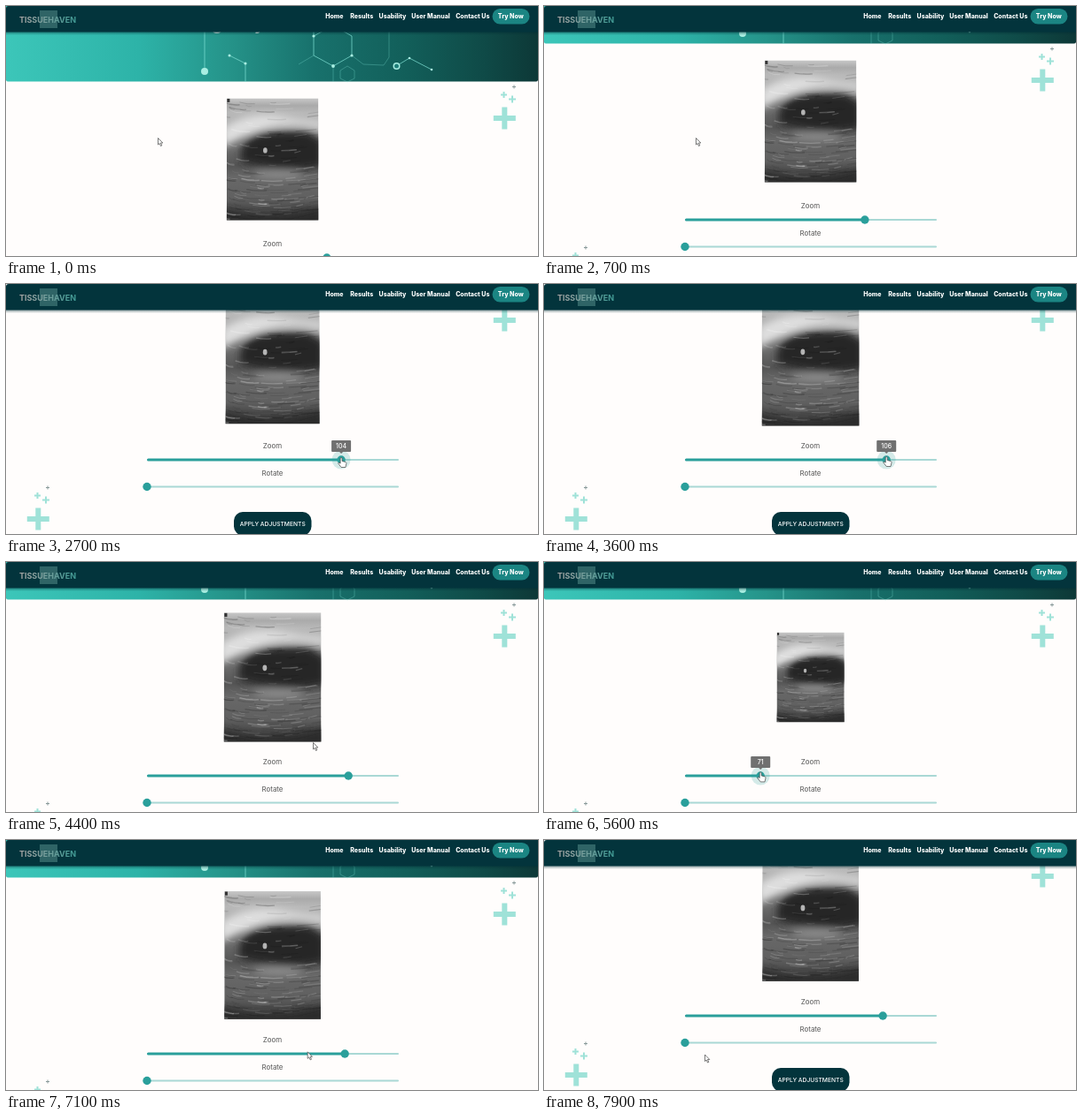
These frames come from a looping animation (600 px wide and 283 px high, 8000 ms). An HTML page:

```html
<!DOCTYPE html>
<html lang="en">
<head>
<meta charset="utf-8">
<title>Image adjustments</title>
<style>
html, body { margin: 0; width: 100%; height: 100%; overflow: hidden; background: #fffdfc; }
svg { display: block; width: 600px; height: 283px; }
text { font-family: Inter, "Open Sans", sans-serif; text-anchor: middle; }
.nav { font-size: 7px; font-weight: 800; fill: #fff; }
.label { font-size: 7.9px; fill: #555; }
.rail { fill: #a9d8d5; }
.accent { fill: #2a9f9b; }
.lines { fill: none; stroke: #7fe0d4; stroke-width: .9; }
.cursor path { fill: #fff; stroke: #444; stroke-width: .7; stroke-linejoin: round; }
</style>
</head>
<body>
<svg viewBox="0 0 600 283">
  <defs>
    <linearGradient id="banner">
      <stop offset="0" stop-color="#3cc6b9"/><stop offset=".25" stop-color="#2db3a8"/>
      <stop offset=".42" stop-color="#259389"/><stop offset=".58" stop-color="#18716c"/>
      <stop offset=".75" stop-color="#125f5a"/><stop offset=".9" stop-color="#0f4a47"/>
      <stop offset="1" stop-color="#0d3837"/>
    </linearGradient>
    <linearGradient id="shade" x2="0" y2="1">
      <stop offset="0" stop-color="#012c33" stop-opacity=".5"/><stop offset="1" stop-color="#012c33" stop-opacity="0"/>
    </linearGradient>
    <linearGradient id="tissue" x2="0" y2="1">
      <stop offset="0" stop-color="#c8c8c8"/><stop offset=".06" stop-color="#aaa"/>
      <stop offset=".12" stop-color="#b8b8b8"/><stop offset=".24" stop-color="#aaa"/>
      <stop offset=".34" stop-color="#777"/><stop offset=".55" stop-color="#555"/>
      <stop offset=".65" stop-color="#686868"/><stop offset=".82" stop-color="#606060"/>
      <stop offset="1" stop-color="#383838"/>
    </linearGradient>
    <linearGradient id="word"><stop offset="0" stop-color="#a5a2a2"/><stop offset="1" stop-color="#3f9a94"/></linearGradient>
    <filter id="soft" x="-40%" y="-40%" width="180%" height="180%"><feGaussianBlur stdDeviation="4"/></filter>
    <filter id="fine"><feGaussianBlur stdDeviation=".7"/></filter>
    <clipPath id="frame"><rect width="103.5" height="138"/></clipPath>
  </defs>
  <rect width="600" height="283" fill="#fffdfc"/>

  <g id="page">
    <rect y="-10" width="600" height="95.5" rx="2" fill="url(#banner)"/>
    <g class="lines">
      <path d="M347 20V56L369 68L390 56V34L369 22L347 34M224 74V29M252 56L270 65V86M440 68L455 59L480 72" opacity=".8"/>
      <path d="M390 56L403 66L426 67L432 58V29M369 68V86M347 56L330 66M385 68L393 73V82L385 86L377 82V73Z" opacity=".35"/>
    </g>
    <g fill="#a9eee2">
      <circle cx="224" cy="74" r="4"/><circle cx="440.5" cy="68" r="4"/>
      <circle cx="440.5" cy="68" r="2.5" fill="#1f7f79"/><circle cx="347" cy="34" r="1.6"/>
      <circle cx="390" cy="56" r="1.6"/><circle cx="369" cy="68" r="1.9"/>
      <circle cx="252" cy="56" r="1.5"/><circle cx="270" cy="65" r="1.6"/>
      <circle cx="455" cy="59" r="1.3"/><circle cx="480" cy="72" r="1.3"/>
    </g>
    <g fill="#d8f3ee" font-size="20" font-weight="600"><text x="238" y="27">g</text><text x="286" y="27">y</text></g>

    <g id="pluses"></g><use href="#pluses" x="-526" y="225"/>

    <g id="scan" clip-path="url(#frame)">
      <rect width="103.5" height="138" fill="url(#tissue)"/>
      <g filter="url(#soft)">
        <path d="M-5 34Q25 14 60 20T108 26V34Q75 26 50 32T-5 56Z" fill="#dedede"/>
        <path d="M16 58Q24 40 50 38T92 38L108 48V76Q84 82 56 79T16 72Z" fill="#262626"/>
        <ellipse cx="58" cy="86" rx="28" ry="4" fill="#939393"/>
        <path d="M-5 124Q50 142 108 122V145H-5Z" fill="#2c2c2c"/>
      </g>
      <g id="streaks" filter="url(#fine)" fill="none"></g>
      <ellipse cx="43.5" cy="59" rx="2.3" ry="3.2" fill="#b4b4b4" filter="url(#fine)"/>
      <rect x=".5" y=".5" width="3" height="4" fill="#333"/>
    </g>

    <text class="label" x="300.5" y="272">Zoom</text>
    <rect class="rail" x="159" y="284" width="284" height="2" rx="1"/>
    <rect class="accent" id="fill" x="159" y="283.5" height="3" rx="1.5"/>
    <g id="knob">
      <circle class="accent" id="halo" r="10.5" opacity=".2"/>
      <circle class="accent" r="4.7"/>
      <g id="tip">
        <path d="M-10 -22H10Q11 -22 11 -21V-10Q11 -9 10 -9H2L0 -7L-2 -9H-10Q-11 -9 -11 -10V-21Q-11 -22 -10 -22Z" fill="#707070"/>
        <text id="value" y="-13" font-size="7" font-weight="500" fill="#fff"></text>
      </g>
    </g>
    <text class="label" x="300.5" y="303">Rotate</text>
    <rect class="rail" x="159" y="314.5" width="284" height="2" rx="1"/>
    <circle class="accent" cx="159" cy="315.5" r="4.7"/>
    <rect x="257" y="344" width="87.5" height="26.5" rx="10" fill="#03343c"/>
    <text x="300.7" y="359.6" font-size="6.7" font-weight="500" fill="#fff">APPLY ADJUSTMENTS</text>
  </g>

  <rect y="29" width="600" height="4" fill="url(#shade)"/>
  <path d="M0 29.5V3Q0 0 3 0H600V29.5Z" fill="#03343c"/>
  <rect x="38" y="5" width="20" height="20" fill="#2f6466"/>
  <text x="47" y="19" font-size="9" font-weight="700" fill="url(#word)">TISSUEHAVEN</text>
  <rect x="548.5" y="3" width="42" height="17.5" rx="8.75" fill="#1b8583"/>
  <g class="nav" id="nav"></g>

  <g id="cursor" class="cursor">
    <path id="arrow" d="M0 0V7.5L1.7 6L3 9L4.3 8.4L3 5.5H5.3Z"/>
    <path id="hand" d="M-1 0Q0 -1 1 0V3.5L5 4.5Q6 5 5.7 6.5L4.8 10.5H0L-3.3 6.2Q-3.3 4.8 -2 5.3L-1 6.2Z"/>
  </g>
</svg>

<script>
const $ = id => document.getElementById(id);
const LOOP = 8000, STEP = 100;

// Static parts built by rule
const items = [["Home", 370.3], ["Results", 401.3], ["Usability", 436], ["User Manual", 479], ["Contact Us", 526.3], ["Try Now", 569.3]];
$("nav").innerHTML = items.map(([s, x]) => `<text x="${x}" y="14">${s}</text>`).join("");

const plus = (x, y, size, width, color) =>
  `<path d="M${x - size / 2} ${y}h${size}M${x} ${y - size / 2}v${size}" stroke="${color}" stroke-width="${width}"/>`;
$("pluses").innerHTML = plus(562.3, 127, 25, 6, "#9fe2d8") + plus(561.5, 100.5, 7, 2, "#9fe2d8") +
  plus(571, 105.5, 8, 2, "#9fe2d8") + plus(573, 91.5, 4, 1, "#899");

let seed = 7;
const rand = () => (seed = seed * 16807 % 2147483647) / 2147483647;
let streaks = "";
for (let i = 0; i < 150; i++) {
  const y = i < 100 ? 80 + rand() * 54 : 4 + rand() * 72;
  const x = rand() * 103 - 8, len = 6 + rand() * 18, bend = (45 - x) * .06;
  const tone = rand() < .5 ? "#fff" : "#111";
  streaks += `<path d="M${x} ${y}q${len / 2} ${1 + bend} ${len} ${bend}" stroke="${tone}" stroke-width="${.6 + rand()}" opacity="${.08 + rand() * .18}"/>`;
}
$("streaks").innerHTML = streaks;

// Keys are [time, value]; values ease between them
function track(keys, t) {
  const i = keys.findIndex(k => k[0] > t);
  if (i < 0) return keys[keys.length - 1][1];
  if (i === 0) return keys[0][1];
  const [t0, a] = keys[i - 1], [t1, b] = keys[i];
  const p = (t - t0) / (t1 - t0);
  return a + (b - a) * p * p * (3 - 2 * p);
}

const scrollKeys = [[400, 0], [650, 43], [800, 43], [1100, 86], [3850, 86], [4150, 43], [7350, 43], [7650, 86]];
const zoomKeys = [[2100, 100], [3000, 106], [4700, 106], [5300, 75], [5550, 71], [5800, 71], [6100, 90], [6250, 100], [6400, 100], [6700, 105]];
const xKeys = [[1000, 171.5], [1700, 352.5], [1900, 361], [3700, 386], [4300, 346.5], [4400, 346.5], [4650, 386], [6850, 382], [7700, 181.5]];
const yKeys = [[1000, 149.5], [1700, 198], [3700, 196], [4300, 204.5], [4400, 204.5], [4650, 238], [6850, 239], [7700, 243]];

const knobX = zoom => 159 + (zoom - 50) / 70 * 284;
const show = (id, on) => $(id).setAttribute("visibility", on ? "visible" : "hidden");
const move = (id, value) => $(id).setAttribute("transform", value);

function draw(now) {
  const t = Math.floor(now % LOOP / STEP) * STEP;
  const zoom = Math.round(track(zoomKeys, t)), x = knobX(zoom);
  const dragging = t >= 1900 && t < 3700 || t >= 4650 && t < 6850;
  const hand = dragging || t >= 1600 && t < 1900;

  move("page", `translate(0 ${-track(scrollKeys, t)})`);
  // The picture trails the slider slightly
  move("scan", `translate(300.6 173.4) scale(${track(zoomKeys, t - 200) / 100}) translate(-51.75 -69)`);
  $("fill").setAttribute("width", x - 159);
  move("knob", `translate(${x} 285)`);
  $("value").textContent = zoom;
  show("halo", dragging);
  show("tip", dragging);

  move("cursor", `translate(${dragging ? x : track(xKeys, t)} ${track(yKeys, t)})`);
  show("hand", hand);
  show("arrow", !hand);
  requestAnimationFrame(draw);
}
requestAnimationFrame(draw);
</script>
</body>
</html>
```
